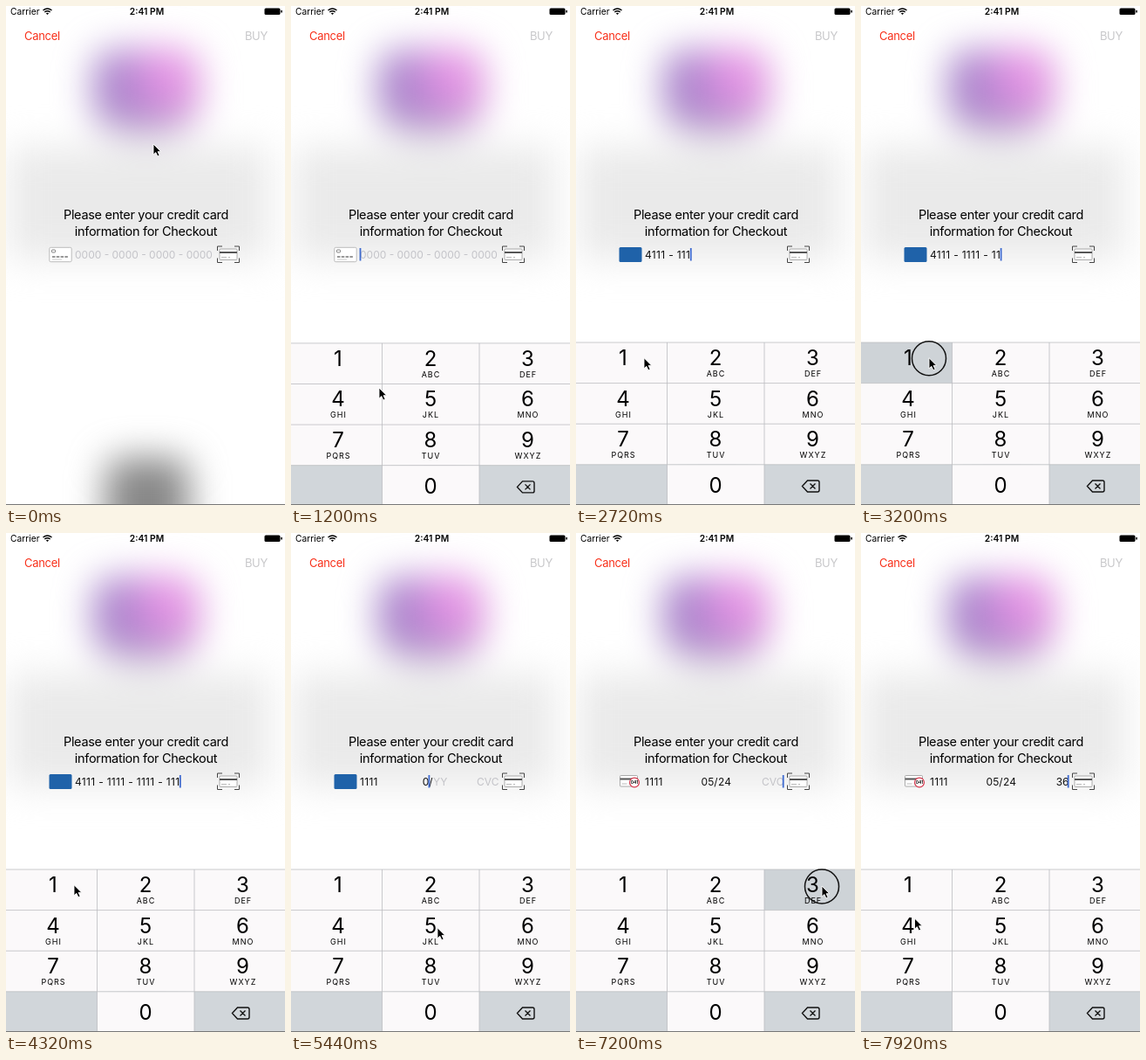
An HTML page that plays this animation: 320x571 px, repeating every 8000 ms.

```html
<!DOCTYPE html>
<html lang="en">
<head>
<meta charset="utf-8">
<title>Card entry</title>
<style>
  html, body { margin: 0; width: 100%; height: 100%; overflow: hidden; background: #fff; }
  svg { display: block; width: 320px; height: 571px; font-family: Inter, "Open Sans", sans-serif; }
  .status { font-size: 10.3px; }
  .nav { font-size: 13px; letter-spacing: -.3px; }
  .title { font-size: 14.5px; letter-spacing: -.3px; text-anchor: middle; }
  .field { font-size: 12px; fill: #111; }
  .field .hint { fill: #c3c3c8; }
  #number { letter-spacing: .32px; }
  .end { text-anchor: end; }
  .digit { font-size: 24px; text-anchor: middle; }
  .letters { font-size: 9px; letter-spacing: 1px; text-anchor: middle; }
</style>
</head>
<body>
<svg viewBox="0 0 320 571">
  <defs>
    <filter id="soft" x="-80%" y="-80%" width="260%" height="260%" color-interpolation-filters="sRGB">
      <feGaussianBlur stdDeviation="21"/>
    </filter>
    <linearGradient id="violet">
      <stop offset="0" stop-color="#a78cca"/>
      <stop offset=".45" stop-color="#b884d2"/>
      <stop offset="1" stop-color="#e09cdf"/>
    </linearGradient>
    <clipPath id="numberClip"><rect x="78" y="270" width="162" height="30"/></clipPath>
    <g id="cardBack">
      <rect width="20" height="12.5" rx="1" fill="#fff" stroke="#999" stroke-width=".8"/>
      <path d="M0 4H20" stroke="#555" stroke-width="2"/>
      <path d="M2 9.5H8M10 9.5H12" stroke="#aaa" stroke-width=".8"/>
    </g>
  </defs>

  <rect width="320" height="571" fill="#fff"/>
  <g filter="url(#soft)">
    <rect x="3" y="162" width="299" height="128" fill="#eaeaea"/>
    <ellipse cx="160" cy="122" rx="60" ry="26" fill="#b5aac4"/>
    <rect x="99" y="50" width="124" height="82" rx="24" fill="url(#violet)"/>
    <ellipse cx="182" cy="78" rx="30" ry="32" fill="#f098ea" opacity=".7"/>
    <rect x="114" y="517" width="96" height="100" rx="20" fill="#888"/>
  </g>

  <g class="status">
    <text x="5" y="10">Carrier</text>
    <text x="161.5" y="10" text-anchor="middle" font-weight="600">2:41 PM</text>
  </g>
  <g fill="none" stroke="#000" stroke-width="1.4">
    <path d="M42.5 5Q47.5 .8 52.5 5M44.3 7Q47.5 4.4 50.7 7"/>
    <path d="M47.5 10L45.9 8.5Q47.5 7.2 49.1 8.5Z" fill="#000" stroke="none"/>
  </g>
  <rect x="296.5" y="2.5" width="18" height="7.5" rx="1.5"/>
  <rect x="315.3" y="4.7" width="1.5" height="3" rx=".7"/>

  <text class="nav" x="21" y="39" fill="#f8301a">Cancel</text>
  <text class="nav end" x="300" y="39" fill="#c8c8ca">BUY</text>
  <text class="title" x="160.5" y="244.3">Please enter your credit card</text>
  <text class="title" x="160.5" y="263">information for Checkout</text>

  <g id="blankCard">
    <rect x="49.8" y="276.3" width="25.4" height="16.4" rx="1.5" fill="#fff" stroke="#bbb"/>
    <rect x="52.5" y="279" width="4" height="3" rx=".6" fill="none" stroke="#777" stroke-width=".9"/>
    <path d="M53 287H71" stroke="#777" stroke-width="1.3" stroke-dasharray="3.5 1.3"/>
    <path d="M53 290H64" stroke="#bbb" stroke-width=".8"/>
  </g>
  <rect id="brandCard" x="49.5" y="276" width="26" height="17" rx="1.5" fill="#1f62a9"/>
  <g id="codeCard">
    <use href="#cardBack" x="50.5" y="277.5"/>
    <circle cx="67" cy="285.5" r="5.4" fill="#fff" stroke="#d5344a" stroke-width="1.2"/>
    <text x="67" y="287.4" font-size="5" font-weight="600" text-anchor="middle">041</text>
  </g>

  <g class="field">
    <g clip-path="url(#numberClip)">
      <text id="hint" class="hint" x="79" y="288.5">0000 - 0000 - 0000 - 0000</text>
      <text id="number" x="79" y="288.5"></text>
    </g>
    <g id="details">
      <text id="month" class="end" x="158.3" y="288.5"></text>
      <text id="slash" x="158.3" y="288.5">/</text>
      <text id="year" x="163" y="288.5"></text>
      <text id="code" class="end" x="238.5" y="288.5"></text>
    </g>
  </g>
  <rect id="caret" y="277" width="1.8" height="14.5" fill="#3f6bd0"/>

  <path d="M242.5 280V275H248M262 275H267.5V280M267.5 288.5V293.5H262M248 293.5H242.5V288.5"
        fill="none" stroke="#444"/>
  <use href="#cardBack" x="245" y="278"/>

  <g id="keyboard"></g>
  <path d="M0 570.5H320" stroke="#777"/>

  <g id="pointer">
    <circle id="ring" cy=".5" r="19.5" fill="none" stroke="#111" stroke-width="1.5"/>
    <path d="M0 0V12.2L2.8 9.6L4.9 14L7.1 13L5.1 8.7H8.8Z" stroke="#fff" stroke-width=".9"/>
  </g>
</svg>
<script>
const $ = id => document.getElementById(id);
const LOOP = 8000, FOCUS = 800, RISE = 860, NUMBER_DONE = 4500;

// Key releases: [time, key]; the first one only focuses the field.
const taps = [[FOCUS, ""], [1560, "4"]];
for (let i = 0; i < 10; i++) taps.push([1980 + 141 * i, "1"]);
for (let i = 1; i < 5; i++) taps.push([3249 + 212 * i, "1"]);
taps.push([NUMBER_DONE, "1"], [5200, "0"], [5590, "5"], [5930, "2"],
          [6300, "4"], [7220, "3"], [7480, "6"]);

// Pointer stops: time, x, y
const path = [
  [0, 169, 158], [680, 130, 286], [870, 130, 286], [1200, 101, 437],
  [1430, 70, 449], [1590, 70, 449], [1830, 78, 402.7], [4560, 78, 402.7],
  [5070, 166, 546], [5220, 166, 546], [5460, 168, 450], [5610, 168, 450],
  [5810, 170, 405], [5950, 170, 405], [6190, 76.5, 443.5], [6480, 76.5, 443.5],
  [7080, 282, 404], [7240, 282, 404], [7370, 282, 448], [7500, 282, 448],
  [7920, 61.5, 441], [LOOP, 61.5, 441]
];

const clamp = v => Math.max(0, Math.min(1, v));
const ease = v => (v = clamp(v), v * v * (3 - 2 * v));
const show = (id, on) => $(id).setAttribute("visibility", on ? "visible" : "hidden");
const move = (id, x, y = 0) => $(id).setAttribute("transform", `translate(${x} ${y})`);

function buildKeyboard() {
  const cols = [0, 104.5, 216, 320], mids = [54, 160, 271.5], top = 385, step = 46.6;
  const letters = ["", "ABC", "DEF", "GHI", "JKL", "MNO", "PQRS", "TUV", "WXYZ"];
  let out = "";
  for (let i = 0; i < 12; i++) {
    const c = i % 3, r = Math.floor(i / 3), y = top + r * step;
    const key = i < 9 ? String(i + 1) : i === 10 ? "0" : "";
    out += `<rect ${key && `id="key${key}"`} x="${cols[c]}" y="${y}" height="${step}"
      width="${cols[c + 1] - cols[c]}" fill="${key ? "#fbf9fa" : "#d1d6da"}"/>
      <text class="digit" x="${mids[c]}" y="${y + (i < 9 ? 25.9 : 32)}">${key}</text>
      <text class="letters" x="${mids[c] + .5}" y="${y + 39}">${letters[i] || ""}</text>`;
  }
  const rows = [0, 1, 2, 3].map(r => `M0 ${top + r * step}H320`).join("");
  out += `<path d="${rows}M104.5 ${top}V571M216 ${top}V571" stroke="#bcbdc0" stroke-width=".8"/>
    <path d="M259.5 549.5L265.5 543H277Q279 543 279 545V554Q279 556 277 556H265.5Z
      M268.5 546.5L274.5 552.5M274.5 546.5L268.5 552.5" fill="none" stroke="#111" stroke-width="1.4"/>`;
  $("keyboard").innerHTML = out;
}

function setField(id, value, placeholder) {
  $(id).textContent = value || placeholder;
  $(id).classList.toggle("hint", !value);
}

function drawPointer(t) {
  const i = path.findIndex(p => p[0] > t);
  const [t0, x0, y0] = path[i - 1], [t1, x1, y1] = path[i];
  const k = ease((t - t0) / (t1 - t0));
  move("pointer", x0 + (x1 - x0) * k, y0 + (y1 - y0) * k);
  show("ring", taps.some(([at]) => t > at - 100 && t < at + 30));
}

function drawKeyboard(t) {
  const u = Math.max(0, t - RISE) * .022;
  move("keyboard", 0, 187 * (1 + u) * Math.exp(-u));
  const down = taps.find(([at]) => t > at - 90 && t < at);
  for (let k = 0; k < 10; k++)
    $("key" + k).setAttribute("fill", down && down[1] === String(k) ? "#ced3d7" : "#fbf9fa");
}

function drawFields(t) {
  const typed = taps.filter(([at]) => at <= t).map(tap => tap[1]).join("");
  const digits = typed.slice(0, 16), month = typed.slice(16, 18);
  const year = typed.slice(18, 20), code = typed.slice(20);
  const full = digits.length === 16, dated = typed.length >= 20;

  const number = $("number");
  number.textContent = (digits.match(/.{1,4}/g) || []).join(" - ");
  const slide = ease((t - NUMBER_DONE) / 320);
  move("number", full ? -number.getSubStringLength(0, 21) * slide : 0);
  show("hint", !digits);

  setField("month", month, "MM");
  setField("year", year, "YY");
  setField("code", code, "CVC");
  $("slash").classList.toggle("hint", !month);
  $("details").setAttribute("opacity", full ? slide : 0);
  move("details", 160 * (1 - slide));

  show("blankCard", !digits);
  show("brandCard", digits && !dated);
  show("codeCard", dated);

  let x = 78.6 + (digits ? number.getComputedTextLength() : 0);
  if (dated) x = 236.8;
  else if (month.length === 2) x = 162.4 + (year ? $("year").getComputedTextLength() : 0);
  else if (full) x = 157.5 + 160 * (1 - slide);
  $("caret").setAttribute("x", x);
  show("caret", t >= FOCUS);
}

buildKeyboard();
const start = performance.now();
function frame() {
  const t = (performance.now() - start) % LOOP;
  drawFields(t);
  drawKeyboard(t);
  drawPointer(t);
  requestAnimationFrame(frame);
}
frame();
</script>
</body>
</html>
```
